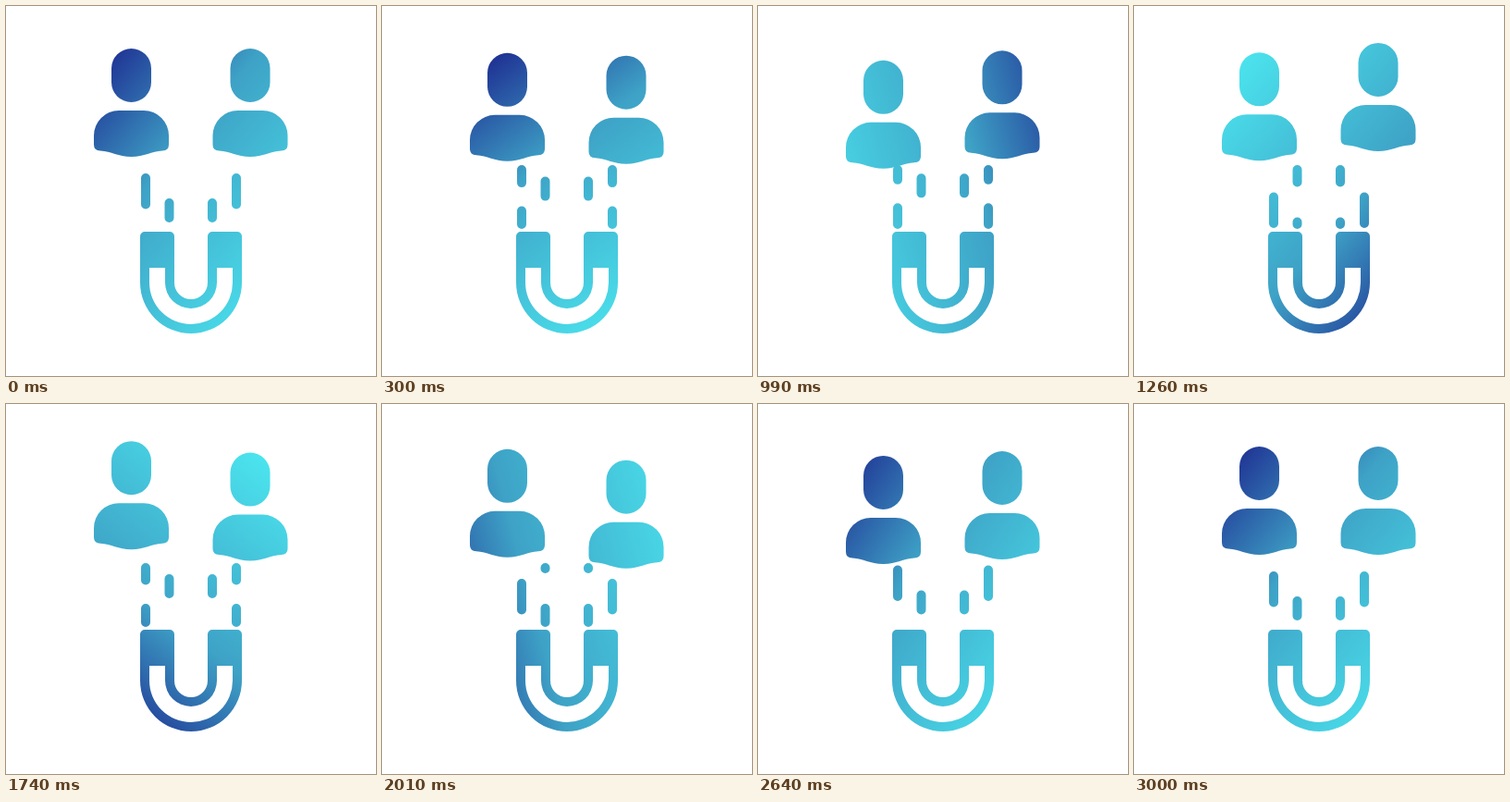
Animation of 400 by 400 pixels, one loop 5.09 s. Source, as an HTML page:

```html
<!DOCTYPE html>
<html lang="en">
<head>
<meta charset="utf-8">
<title>Attracting people</title>
<style>
  html, body { margin: 0; width: 100%; height: 100%; overflow: hidden; background: #fff; }
  svg { display: block; width: 100%; height: 100%; }
  .beam { fill: none; stroke: url(#tint); stroke-width: 10; stroke-linecap: round; }
  .long { stroke-dasharray: 28.5 30.5; }
  .short { stroke-dasharray: 16 43; }
</style>
</head>
<body>
<svg viewBox="0 0 400 400">
  <defs>
    <linearGradient id="tint" gradientUnits="userSpaceOnUse" x1="40" y1="200" x2="360" y2="200">
      <stop offset="0" stop-color="#203595"/>
      <stop offset=".375" stop-color="#3ea2c6"/>
      <stop offset="1" stop-color="#4be4ee"/>
    </linearGradient>
    <clipPath id="people">
      <path class="person"/>
      <path class="person"/>
    </clipPath>
  </defs>
  <path class="beam long" d="M151 177V236M249 177V236"/>
  <path class="beam short" d="M176.5 177V236M223 177V236"/>
  <!-- The gradient stays fixed to the stage while the people move through it. -->
  <rect width="400" height="400" fill="url(#tint)" clip-path="url(#people)"/>
  <path fill="url(#tint)" fill-rule="evenodd" d="M150 244h27a5 5 0 0 1 5 5v50a18 18 0 0 0 36 0v-50a5 5 0 0 1 5-5h27a5 5 0 0 1 5 5v50a55 55 0 0 1-110 0v-50a5 5 0 0 1 5-5z
    M155 283h17v16a28 28 0 0 0 56 0v-16h17v16a45 45 0 0 1-90 0z"/>
</svg>
<script>
  const LOOP = 5090, ACTIVE = 3000, STEP = 30, DASH_PERIOD = 59;

  const HEAD = 'M114 67.5a21.5 21.5 0 0 1 43 0v15a21.5 21.5 0 0 1-43 0z';
  const BODY = 'M122 113h27a27 27 0 0 1 27 27v10q0 6-7 6.5C157 157 150 163 135.5 163' +
    'S114 157 102 156.5q-7-.5-7-6.5v-10a27 27 0 0 1 27-27z';

  // Keyframes: [time in ms, vertical offset]
  const people = [
    { x: 0, keys: [[0, 0], [800, 15.3], [1700, -6], [2400, 15.3], [3000, 0]] },
    { x: 128.5, keys: [[0, 0], [590, 15], [1300, -6.3], [2070, 15], [3000, 0]] }
  ];

  const tint = document.getElementById('tint');
  const long = document.querySelector('.long');
  const short = document.querySelector('.short');
  document.querySelectorAll('.person').forEach((path, i) => {
    path.setAttribute('d', HEAD + BODY);
    people[i].path = path;
  });

  function bezier(x1, y1, x2, y2) {
    const at = (a, b, s) => 3 * (1 - s) * s * ((1 - s) * a + s * b) + s * s * s;
    return x => {
      let low = 0, high = 1;
      for (let i = 0; i < 24; i++) {
        const mid = (low + high) / 2;
        if (at(x1, x2, mid) < x) low = mid; else high = mid;
      }
      return at(y1, y2, high);
    };
  }

  const easeFlow = bezier(.3, .245, .55, 1);
  const easeTurn = bezier(.3, 0, .48, 1);

  function tween(keys, t) {
    const i = Math.max(1, keys.findIndex(([time]) => time >= t));
    const [t0, v0] = keys[i - 1], [t1, v1] = keys[i];
    const p = (t - t0) / (t1 - t0);
    return v0 + (v1 - v0) * p * p * (3 - 2 * p);
  }

  function draw(now) {
    const t = Math.min(ACTIVE, Math.floor(now % LOOP / STEP) * STEP);
    const p = t / ACTIVE;
    for (const { x, keys, path } of people) {
      path.setAttribute('transform', `translate(${x} ${tween(keys, t)})`);
    }
    const flow = 6 * easeFlow(p) % 1 * DASH_PERIOD;
    long.style.strokeDashoffset = -9 - flow;
    short.style.strokeDashoffset = -36 - flow;
    tint.setAttribute('gradientTransform', `rotate(${40 + 360 * easeTurn(p)} 200 200)`);
  }

  const start = performance.now();
  function frame() {
    draw(performance.now() - start);
    requestAnimationFrame(frame);
  }
  frame();
</script>
</body>
</html>
```
